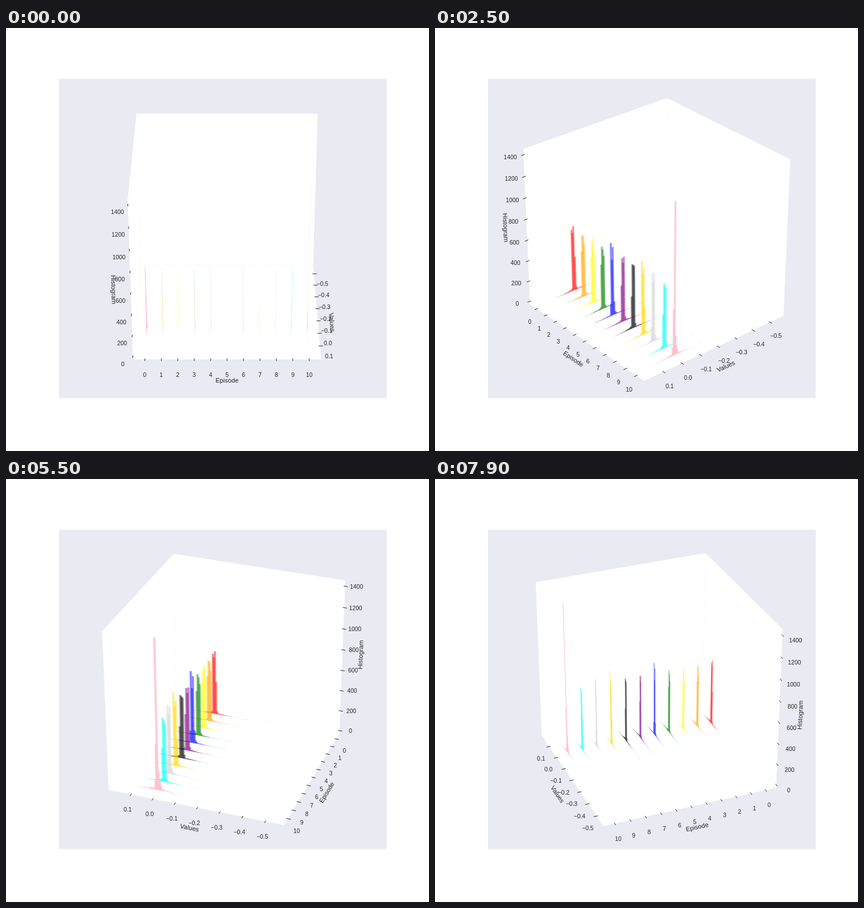
These frames come from a looping animation (748 by 748 pixels, 8 s). An HTML page:

```html
<!DOCTYPE html>
<html lang="en">
<head>
<meta charset="utf-8">
<title>Rotating histograms</title>
<style>
  html, body { margin: 0; width: 100%; height: 100%; overflow: hidden; background: #fff; }
  svg { display: block; width: 748px; height: 748px; }
  text { font-family: "Liberation Sans", Arial, sans-serif; fill: #262626; text-anchor: middle; }
  .tick { font-size: 10.4px; }
  .label { font-size: 11.3px; }
  .mark { stroke: #262626; stroke-width: 1; }
</style>
</head>
<body>
<svg id="stage" viewBox="0 0 748 748">
  <rect x="93.5" y="89.8" width="579.7" height="564.7" fill="#eaeaf2"/>
</svg>
<script>
const stage = document.getElementById('stage');
const STEP_MS = 100, STEPS = 80, DEGREES = 2;
const EDGE = 0.5 + 1 / 48;         // panes reach a little past the unit cube
const DELTA = 1 / 12;
const TICK_PAD = 0.629 * DELTA, LABEL_PAD = 1.0485 * DELTA;
const ELEV = Math.PI / 6, SIN_E = Math.sin(ELEV), COS_E = Math.cos(ELEV);

const scaleX = v => (v + 0.5647) / 0.7517 - 0.5;
const scaleY = e => (e + 0.5) / 11 - 0.5;
const scaleZ = n => n / 1423 - 0.5;

function add(name, attrs = {}, text = '') {
  const el = document.createElementNS('http://www.w3.org/2000/svg', name);
  set(el, attrs);
  el.textContent = text;
  return stage.appendChild(el);
}
function set(el, attrs) {
  for (const key in attrs) el.setAttribute(key, attrs[key]);
}

// Camera
let sinA = 0, cosA = 1;
function project([x, y, z]) {
  const right = cosA * y - sinA * x;
  const near = cosA * x + sinA * y;
  const w = 10 - z * SIN_E - near * COS_E;
  return [390.9 + 3133.5 * right / w, 364.5 - 3052.6 * (z * COS_E - near * SIN_E) / w];
}
const toPoints = list => list.map(p => project(p).map(n => n.toFixed(2)).join()).join(' ');

// Panes
const panes = [0, 1, 2].map(() => add('polygon', { fill: '#fff' }));
function drawPanes(back) {
  panes.forEach((pane, axis) => {
    const corners = [[-1, -1], [1, -1], [1, 1], [-1, 1]].map(([a, b]) => {
      const p = [a * EDGE, b * EDGE];
      p.splice(axis, 0, back[axis]);
      return p;
    });
    set(pane, { points: toPoints(corners) });
  });
}

// Axes
const range = (n, f) => Array.from({ length: n }, (_, i) => f(i));
const axes = [
  { index: 0, flip: 1, tickDir: 1, name: 'Values', scale: scaleX,
    values: range(7, i => (i - 5) / 10), format: v => v.toFixed(1).replace('-', '\u2212') },
  { index: 1, flip: 0, tickDir: 0, name: 'Episode', scale: scaleY,
    values: range(11, i => i), format: String },
  { index: 2, flip: 0, tickDir: 0, name: 'Histogram', scale: scaleZ,
    values: range(8, i => i * 200), format: String }
];
for (const axis of axes) {
  axis.label = add('text', { class: 'label', y: 3.2 }, axis.name);
  axis.ticks = axis.values.map(v => ({
    at: axis.scale(v),
    mark: add('line', { class: 'mark' }),
    text: add('text', { class: 'tick' }, axis.format(v))
  }));
}
const pushOut = (p, pad, index) =>
  p.map((n, i) => i === index ? n : n + (n < 0 ? -pad : pad));

function drawAxis({ index, flip, tickDir, label, ticks }, back) {
  const edge = back.slice();
  edge[flip] *= -1;
  const at = n => edge.map((v, i) => i === index ? n : v);

  const [x1, y1] = project(at(-EDGE)), [x2, y2] = project(at(EDGE));
  let angle = (Math.atan2(y1 - y2, x2 - x1) * 180 / Math.PI + 360) % 180;
  if (angle > 90) angle -= 180;
  const [lx, ly] = project(pushOut(at(0), LABEL_PAD, index));
  set(label, { transform: `translate(${lx} ${ly}) rotate(${-angle})` });

  const sign = Math.sign(back[tickDir]);
  for (const tick of ticks) {
    const pos = at(tick.at);
    const inner = pos.slice(), outer = pos.slice();
    inner[tickDir] += 0.1 * sign * DELTA;
    outer[tickDir] -= 0.2 * sign * DELTA;
    const a = project(inner), b = project(outer);
    set(tick.mark, { x1: a[0], y1: a[1], x2: b[0], y2: b[1] });
    const [tx, ty] = project(pushOut(pos, TICK_PAD, index));
    set(tick.text, { x: tx, y: Math.round(ty + 8.3) });
  }
}

// Histograms: the tall bins around zero, the tails follow a decay
const BIN = 0.005, FIRST = 0.0078;
const series = [
  ['red', 25, 602, 568, 630, 326, 30],
  ['orange', 25, 450, 603, 595, 507, 30],
  ['yellow', 25, 450, 580, 628, 500, 30],
  ['green', 25, 440, 608, 580, 515, 30],
  ['blue', 120, 705, 542, 660, 130, 30],
  ['purple', 25, 357, 614, 568, 623, 40],
  ['black', 25, 313, 617, 606, 595, 40],
  ['gold', 30, 715, 580, 634, 258, 30],
  ['lightgray', 150, 663, 572, 654, 60, 25],
  ['cyan', 30, 332, 618, 597, 570, 30],
  ['pink', 80, 440, 1422, 180, 90, 45]
];
function noise(a, b) {
  const n = Math.sin(a * 12.9898 + b * 78.233) * 43758.5453;
  return n - Math.floor(n);
}
function count(peaks, episode, i) {
  if (i in peaks) return peaks[i];
  const distance = Math.abs(FIRST - i * BIN);
  return 22 * Math.exp(-distance / 0.03) * (0.5 + noise(i, episode));
}
// Bars are two bins wide, so even and odd bins form two overlapping outlines.
function outline(peaks, episode, parity) {
  const y = scaleY(episode), points = [];
  const put = (v, n) => points.push([scaleX(v), y, scaleZ(n)]);
  const start = -18 + parity, end = 34 + parity;
  put(FIRST - (start - 1) * BIN, 0);
  for (let i = start; i <= end; i += 2) {
    const v = FIRST - i * BIN, n = count(peaks, episode, i);
    put(v + BIN, n);
    put(v - BIN, n);
  }
  put(FIRST - (end + 1) * BIN, 0);
  return points;
}
const bars = series.flatMap(([color, ...peaks], episode) => [0, 1].map(parity => ({
  points: outline(peaks, episode, parity),
  el: add('polygon', { fill: color, 'fill-opacity': color === 'pink' ? 0.8 : 0.45 })
})));

function render(ms) {
  const step = Math.floor(ms / STEP_MS) % STEPS;
  const azimuth = step * DEGREES * Math.PI / 180;
  sinA = Math.sin(azimuth);
  cosA = Math.cos(azimuth);
  const back = [cosA < -1e-9 ? EDGE : -EDGE, -EDGE, -EDGE];
  drawPanes(back);
  axes.forEach(axis => drawAxis(axis, back));
  bars.forEach(bar => set(bar.el, { points: toPoints(bar.points) }));
}

const began = performance.now();
function loop() {
  render(performance.now() - began);
  requestAnimationFrame(loop);
}
loop();
</script>
</body>
</html>
```
